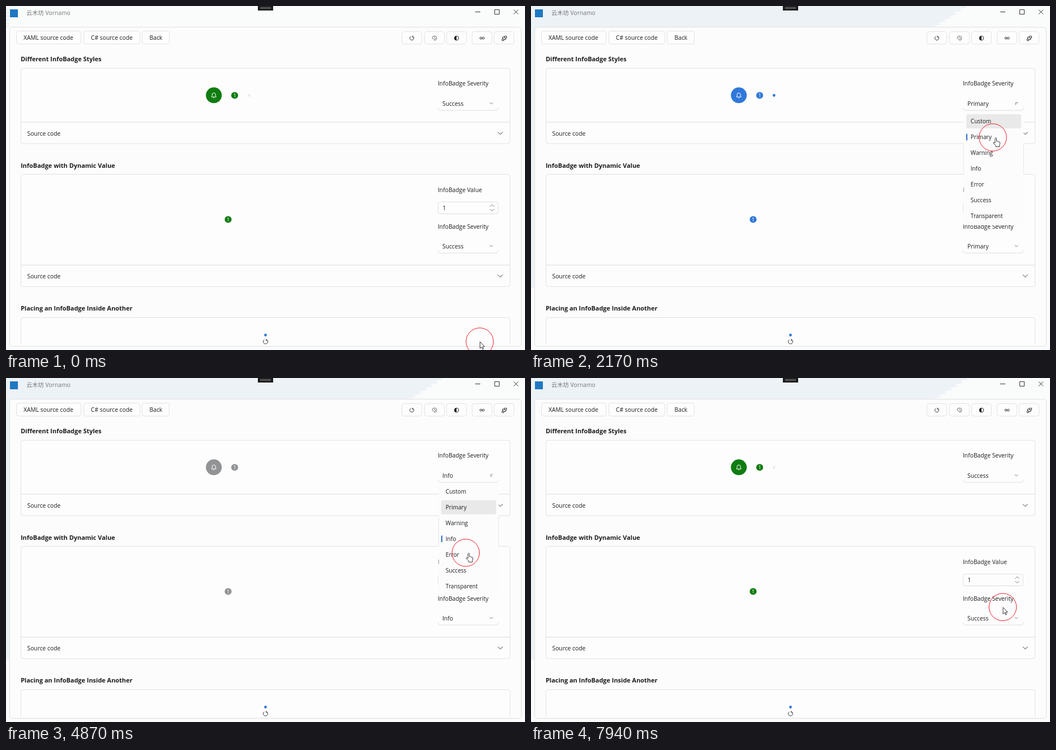
Write an HTML page that moves like this. It is 917x610 px and loops after 7990 ms.

```html
<!DOCTYPE html>
<html lang="en">
<head>
<meta charset="utf-8">
<title>InfoBadge</title>
<style>
  html, body { margin: 0; width: 100%; height: 100%; overflow: hidden; background: #fafbfb; }
  svg { display: block; width: 917px; height: 610px; }
  text { font: 10.3px "Open Sans", "Noto Sans", "Noto Sans CJK SC", sans-serif; fill: #1c1c1c; }
  .head { font-size: 10.95px; font-weight: 700; }
  .item { font-size: 10.1px; }
  .title { font-family: "Open Sans", "Noto Sans CJK SC", "Noto Sans CJK", sans-serif; fill: #777; }
  .one { font-size: 9px; fill: #fff; text-anchor: middle; }
  .box { fill: #fdfdfd; stroke: #e2e2e2; }
  .edge { fill: none; stroke: #dcdcdc; }
  .ink { fill: none; stroke: #333; }
  .soft { fill: none; stroke: #777; }
</style>
</head>
<body>
<svg viewBox="0 0 917 610">
  <defs><clipPath id="under"><rect x="760" y="186" width="115" height="210"/></clipPath></defs>
  <path id="tint" fill="#edf2f7"/>
  <g id="page"></g>
  <g id="popup" clip-path="url(#under)"><g id="list"></g></g>
  <g id="pointer">
    <circle r="24.2" fill="none" stroke="#f01c24"/>
    <path id="arrow" d="M.5 .5V12.2L3.2 9.7 5 13.8 6.8 13 5 9H8.7Z" fill="#fff" stroke="#222" stroke-width=".9"/>
    <path id="hand" d="M4 10V1.5Q5.3-.3 6.5 1.5V6.5L11.5 8Q13 8.4 12.7 10L11.8 13.5V16.5H5.3V14.5L1 10.3Q.6 8.4 2.3 8.7Z"
      fill="#fff" stroke="#222" stroke-width=".9"/>
  </g>
</svg>
<script>
const LOOP = 7990, SLIDE = 300, LIST_H = 203;
const items = ['Custom', 'Primary', 'Warning', 'Info', 'Error', 'Success', 'Transparent'];

// time, item, badge colour, dot colour
const picks = [
  [0, 5, '#107c10', '#e6eee6'],
  [1350, 1, '#3079da', '#3079da'],
  [2620, 2, '#e6a23c', '#f8f3cf'],
  [3940, 3, '#929395', '#fdfdfd'],
  [5500, 4, '#f56c6c', '#ebebeb'],
  [7040, 5, '#107c10', '#e6eee6']
];
const opens = [[710, 1350], [1910, 2620], [3150, 3940], [4650, 5500], [5885, 7040]];

// time, x, y
const path = [
  [0, 837, 595], [50, 837, 595], [600, 826, 174], [760, 826, 172], [1030, 826, 203.5],
  [1250, 820, 233], [1400, 820, 233], [1850, 822, 177], [1950, 822, 177], [2170, 816, 233],
  [2400, 818, 261], [2640, 818, 261], [3000, 827, 172.5], [3300, 827, 172.5], [3700, 820, 289],
  [3930, 820, 289], [4110, 820, 196], [4350, 818, 168], [4680, 818, 168], [4900, 812, 317],
  [5450, 812, 317], [5800, 809.5, 169.5], [6080, 809.5, 169.5], [6210, 812, 230],
  [6690, 815, 345], [7000, 815, 345], [7500, 836, 552], [7720, 834, 434], [7940, 833.5, 406.2],
  [LOOP, 833.5, 406.2]
];

const $ = id => document.getElementById(id);
const text = (x, y, s, c = '', id = '') => `<text x="${x}" y="${y}" class="${c}" id="${id}">${s}</text>`;
const box = (x, y, w, h) => `<rect class="box" x="${x + .5}" y="${y + .5}" width="${w}" height="${h}" rx="4"/>`;
const line = (d, c = 'ink', extra = '') => `<path class="${c}" d="${d}" ${extra}/>`;
const disc = (x, y, r, c = 'badge') => `<circle class="${c}" cx="${x}" cy="${y}" r="${r}"/>`;
const badge = (x, y) => disc(x, y, 6.1) + text(x, y + 3.2, '1', 'one');
const button = (x, w, s, tx) => box(x, 44, w, 23) + text(tx, 60, s);
const expander = y => text(37.5, y + 4, 'Source code') + line(`M869 ${y - 2}l4.3 4.3 4.3-4.3`);
const combo = (y, id) =>
  line(`M763.5 ${y + 8}q0 4.5 4 4.5H866q4 0 4-4.5`, 'edge') +
  text(771, y + 4, '', 'choice') +
  `<path class="soft" id="${id}" d="M-2.8-1.4L0 1.4 2.8-1.4" transform="translate(857.5 ${y})"/>`;
const reload = (x, y, r) =>
  line(`M${x - r * .5} ${y - r * .87}A${r} ${r} 0 1 0 ${x + r * .5} ${y - r * .87}m-.8-1.2v2.4h2.4`);

$('page').innerHTML =
  '<rect x="7" y="6" width="14" height="14" fill="#1f78c1"/>' +
  text(36, 16, '云木坊 Vornamo', 'title') +
  '<path d="M445 0H472V8H445Z" fill="#1c1c1c"/>' + line('M449 2.5H468M449 4.5H468', 'soft') +
  line('M829 10.5H838M863.5 6.5H871.5V14.5H863.5ZM897 6.5L905 14.5M905 6.5L897 14.5') +
  '<rect x="6.5" y="37.5" width="904" height="566" rx="5" fill="#fcfcfc" stroke="#e0e0e0"/>' +
  button(18, 114, 'XAML source code', 31) + button(137, 99, 'C# source code', 150) + button(240, 48, 'Back', 253.5) +
  [699, 739, 778, 823, 862].map(x => box(x, 45, 35, 22)).join('') +
  reload(717, 57, 3.5) +
  line('M753 57A4 4 0 1 1 757 61Q757 58 755 58T753 57M756 55.5Q759.5 55 758.5 59', 'soft') +
  disc(796, 57, 3.8, 'ink') + '<path d="M796 53.2A3.8 3.8 0 0 0 796 60.8Z" fill="#222"/>' +
  disc(839, 57, 1.8, 'ink') + disc(843.3, 57, 1.8, 'ink') +
  line('M880.5 53.5h4v3h-4zM876.5 58.5h3v3h-3zM880 55h-2.5v3.5M883 56.5v3h-3') +
  text(26, 98, 'Different InfoBadge Styles', 'head') +
  box(26, 110, 864, 133.5) + line('M27 206H890', 'edge') + expander(225.5) +
  disc(367.2, 158.3, 14) +
  line('M363 161.2H371.4L370.2 159.2V157Q370.2 154.2 367.2 154.2T364.2 157V159.2ZM366 162.7Q367.2 164 368.4 162.7', 'ink', 'style="stroke:#fff"') +
  badge(404, 158.5) + disc(429.4, 158.5, 2.4, 'dot') +
  text(763, 141, 'InfoBadge Severity') + combo(172.5, 'chevron') +
  text(26, 286.5, 'InfoBadge with Dynamic Value', 'head') +
  box(26, 298, 864, 199) + line('M27 459.5H890', 'edge') + expander(478.5) +
  badge(392.5, 378.5) +
  text(763, 330, 'InfoBadge Value') + box(763, 347, 106, 21) +
  line('M766 368.5H867', 'edge') + text(771.5, 362, '1') +
  line('M855.5 355.8l3.5-3.5 3.5 3.5M855.5 360l3.5 3.5 3.5-3.5', 'soft') +
  text(763, 395, 'InfoBadge Severity') + combo(425.5, 'chevron2') +
  text(26, 539.5, 'Placing an InfoBadge Inside Another', 'head') +
  line('M26.5 600V556.5q0-4 4-4H886.5q4 0 4 4V600', 'box') +
  '<circle cx="458.5" cy="583.5" r="2.4" fill="#3079da"/>' + reload(458.5, 595.2, 4);

$('list').innerHTML =
  `<rect x="764.5" y="186" width="106" height="${LIST_H}" fill="#fcfcfc"/>` +
  '<rect id="hover" x="769" width="97" height="25" rx="3" fill="#e9e9e9"/>' +
  '<rect id="mark" x="769" width="2" height="12" rx="1" fill="#2c70cc"/>' +
  items.map((s, i) => text(776.8, 208.8 + 28 * i, s, 'item')).join('');
$('popup').insertAdjacentHTML('beforeend', line('M764.5 245V298M870.5 245V298', 'edge', 'id="sides" style="stroke:#e8e8e8"'));

function cursorAt(t) {
  const i = Math.max(1, path.findIndex(k => k[0] >= t));
  const [t0, x0, y0] = path[i - 1], [t1, x1, y1] = path[i];
  const p = Math.min(1, Math.max(0, (t - t0) / (t1 - t0))), e = p * p * (3 - 2 * p);
  return [x0 + (x1 - x0) * e, y0 + (y1 - y0) * e];
}

// Pale tint spreading from the top left with a ragged diagonal front
function tintPath(t) {
  const f = 1 - Math.exp(-t / 355);
  let d = 'M0 0';
  for (let y = 0; y <= 38; y += 2) {
    const x = Math.max(0, (770 - 1.52 * y) * f + 4 * Math.sin(y * 7.3));
    d += `H${x.toFixed(1)}v2`;
  }
  return f ? d + `L6 ${500 * f}H0Z` : '';
}

function draw(t) {
  const [x, y] = cursorAt(t);
  const [, chosen, color, dot] = picks.filter(p => p[0] <= t).pop();
  const run = opens.filter(o => o[0] <= t).pop();
  const open = run && t < run[1];
  const clampTurn = a => Math.min(180, Math.max(0, a));
  const turn = !run ? 0 : open ? clampTurn((t - run[0] - 90) * .8) : clampTurn(180 - (t - run[1]) * .8);

  $('tint').setAttribute('d', tintPath(t));
  document.querySelectorAll('.badge').forEach(b => b.setAttribute('fill', color));
  document.querySelector('.dot').setAttribute('fill', dot);
  document.querySelectorAll('.choice').forEach(c => c.textContent = items[chosen]);
  $('chevron').setAttribute('transform', `translate(857.5 172.5) rotate(${turn})`);

  $('popup').style.display = open ? '' : 'none';
  if (open) {
    const left = Math.max(0, 1 - (t - run[0]) / SLIDE), shift = 200 * left ** 3;
    const seenY = cursorAt(t - 90)[1];
    const hot = seenY < 191 ? chosen : Math.min(6, Math.max(0, Math.round((seenY - 205) / 28)));
    $('list').setAttribute('transform', `translate(0 ${-shift})`);
    $('hover').setAttribute('y', 192.5 + 28 * hot);
    $('mark').setAttribute('y', 199 + 28 * chosen);
    $('sides').style.display = shift < 90 ? '' : 'none';
  }

  const hand = open && y > 190;
  $('pointer').setAttribute('transform', `translate(${x} ${y})`);
  $('hand').style.display = hand ? '' : 'none';
  $('arrow').style.display = hand ? 'none' : '';
}

const start = performance.now();
function tick(now) {
  draw(Math.max(0, now - start) % LOOP);
  requestAnimationFrame(tick);
}
draw(0);
requestAnimationFrame(tick);
</script>
</body>
</html>
```
